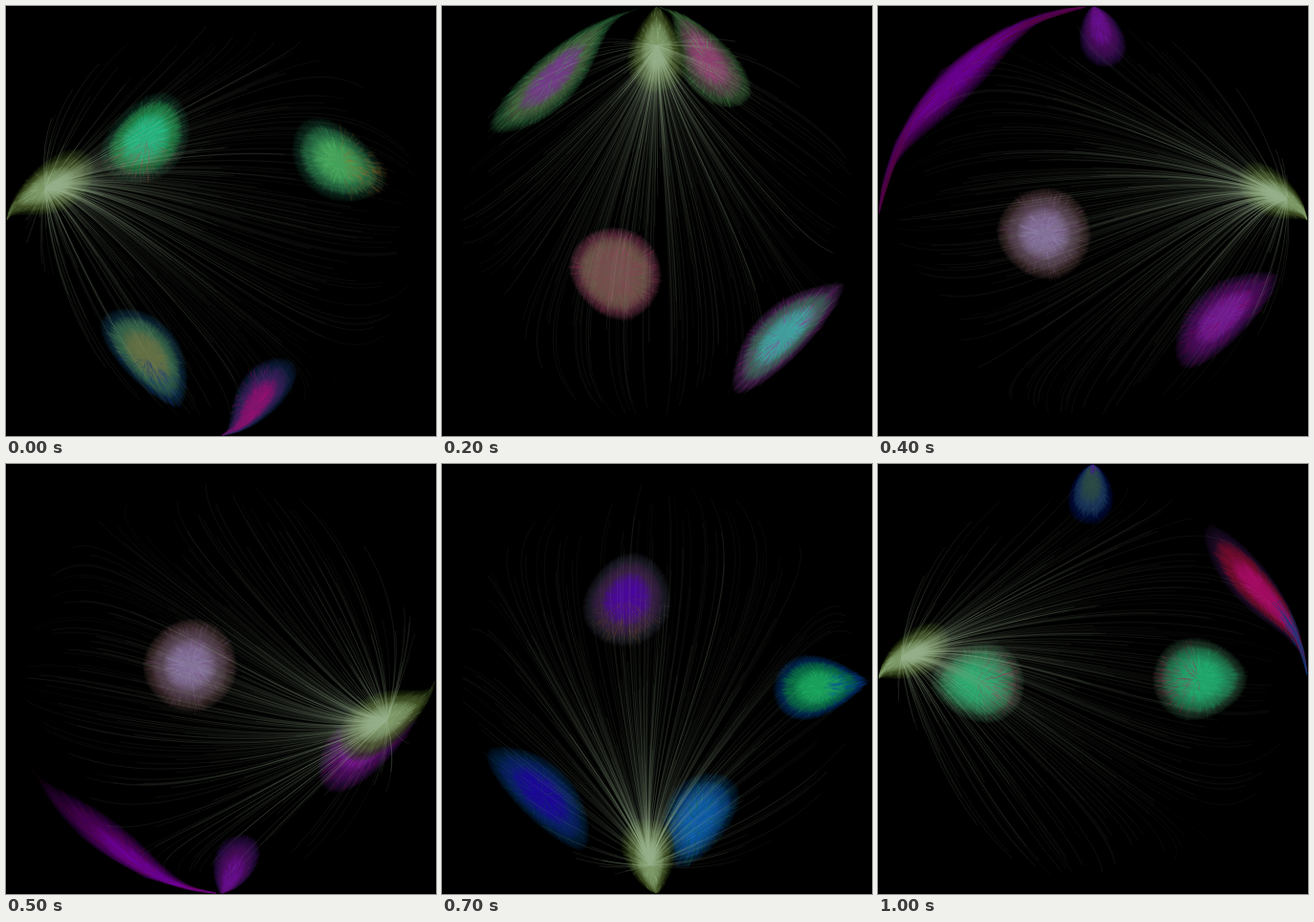
An HTML page with a canvas that plays this animation: 450 px wide and 450 px high, repeating every 1100 ms.

```html
<!DOCTYPE html>
<html>
<head>
<meta charset="utf-8">
<style>
  html, body { margin: 0; width: 100%; height: 100%; overflow: hidden; background: #000; }
  canvas { display: block; }
</style>
</head>
<body>
<canvas id="stage" width="450" height="450"></canvas>
<script>
const ctx = document.getElementById('stage').getContext('2d');
const STEP = 100, STEPS = 11, TAU = Math.PI * 2, RADIUS = .22;

// Positions on a square from -1 to 1 whose opposite edges join
const blobKeys = [0, 2, 4, 6, 8, 10];
const blobs = [
  [[.32, .88], [-.2, .25], [-.23, .06], [-.06, -.19], [-.24, -.56], [-.02, -.94]],
  [[-.44, .67], [.7, .66], [.68, .56], [.75, .29], [.78, -.18], [.88, -.66]],
  [[.57, -.33], [.36, -.78], [.08, -.94], [.18, .84], [.33, .5], [.5, 0]],
  [[-.38, -.41], [-.66, -.77], [-.86, -.87], [-.65, .8], [-.63, .48], [-.54, .02]]
];
const sourceKeys = [0, 1, 2, 3, 4, 6, 8, 10];
const source = [[-.83, -.27], [-.79, -.82], [0, -.82], [.75, -.83], [.91, -.24], [.67, .85], [-.8, .89], [-.9, -.22]];

// Edge, middle, core, fleck and an optional side for the flecks
const palettes = [
  ['124 426 a17 917 left', '134 475 774 138 down', '132 385 5b6 a62 right', '132 295 2c9 a44 down'],
  ['024 146 012 035', '013 024 025 024', '024 035 147 036', '012 024 135 024'],
  ['634 765 755 a36', '425 476 4bb a29', '353 645 a48 5a5', '253 564 83a 4a5'],
  ['433 656 98b 747', '314 516 82a 805', '315 516 71a 414', '304 506 70a 612'],
  ['223 425 50b 642 down', '036 184 2b6 04a right', '024 159 16b 063', '024 127 20a 145'],
  Array(4).fill('025 174 2c4 148'),
  ['014 246 354 51a up', '213 813 b17 048 right', '243 296 2b7 a25 left', '243 396 2b7 a25 right']
];
const sides = { right: 0, down: TAU / 4, left: TAU / 2, up: -TAU / 4 };
const paletteAt = step => palettes[step < 3 ? step : Math.floor(step / 2) + 1];

let seed;
function random() {
  seed = (seed * 1664525 + 1013904223) % 4294967296;
  return seed / 4294967296;
}

// A long jump means that the part leaves through one edge and returns at the other
function blend(a, b, t) {
  let gap = b - a;
  if (Math.abs(gap) > 1.6) gap -= 2 * Math.sign(gap);
  const v = a + gap * t;
  return Math.abs(v) > 1 ? v - 2 * Math.sign(v) : v;
}

function placeAt(keys, places, step) {
  const next = keys.findIndex(key => key >= step);
  if (keys[next] === step) return places[next];
  const t = (step - keys[next - 1]) / (keys[next] - keys[next - 1]);
  return places[next - 1].map((v, i) => blend(v, places[next][i], t));
}

// Square to disc: x = p * sqrt(1 - y²), y = q * sqrt(1 - x²)
function project(p, q) {
  const clamp = v => Math.max(-.9995, Math.min(.9995, v));
  p = clamp(p);
  q = clamp(q);
  const k = Math.sqrt(1 - p * p * q * q);
  return [225 + 224 * p * Math.sqrt(1 - q * q) / k, 225 + 224 * q * Math.sqrt(1 - p * p) / k];
}

function drawBlob([p, q], palette, strands = 800) {
  const [edge, middle, core, fleck, side] = palette.split(' ');
  const bands = [edge, middle, core].map(c => '#' + c);
  const layers = 21;
  const at = (angle, r) => project(p + Math.cos(angle) * r * RADIUS, q + Math.sin(angle) * r * RADIUS);
  ctx.globalAlpha = .15;
  for (let i = 0; i < layers; i++) {
    ctx.beginPath();
    for (let k = 0; k < 90; k++) ctx.lineTo(...at(k / 90 * TAU, Math.sqrt(1 - i / layers)));
    ctx.fillStyle = bands[Math.floor(i / layers * 3)];
    ctx.fill();
  }
  // Fine radial fibres give the feathery grain
  ctx.lineWidth = .7;
  for (let i = 0; i < strands; i++) {
    const angle = random() * TAU, r = Math.sqrt(random()) * .85;
    const chance = side ? Math.cos(angle - sides[side]) * .8 : .3;
    const band = Math.min(2, Math.floor((1 - r) * 3.4));
    ctx.strokeStyle = random() < chance ? '#' + fleck : bands[band];
    ctx.globalAlpha = .15 + .4 * random() * (1 - r * .6);
    ctx.beginPath();
    ctx.moveTo(...at(angle, r));
    ctx.lineTo(...at(angle, r + .08 + random() * .14));
    ctx.stroke();
  }
  ctx.globalAlpha = 1;
}

// Straight lines on the square become the curved rays
function drawRays([p, q]) {
  const [x, y] = project(p, q);
  const fade = ctx.createRadialGradient(x, y, 0, x, y, 410);
  [[0, .5], [.06, .36], [.16, .24], [.5, .17], [1, .1]]
    .forEach(([stop, alpha]) => fade.addColorStop(stop, `rgba(150,176,140,${alpha})`));
  ctx.strokeStyle = fade;
  ctx.lineWidth = .7;
  for (let i = 0; i < 300; i++) {
    const dp = (random() * 2 - 1) * .93 - p, dq = (random() * 2 - 1) * .93 - q;
    ctx.globalAlpha = .3 + .7 * random();
    ctx.beginPath();
    for (let t = 0; t <= 40; t++) ctx.lineTo(...project(p + dp * t / 40, q + dq * t / 40));
    ctx.stroke();
  }
  ctx.globalAlpha = 1;
}

function draw(step) {
  seed = 77;
  ctx.fillStyle = '#000';
  ctx.fillRect(0, 0, 450, 450);
  const colors = paletteAt(step);
  // The blobs rest between the second and third step
  const blobStep = step === 1 ? 2 : step;
  blobs.forEach((places, i) => drawBlob(placeAt(blobKeys, places, blobStep), colors[i]));
  const origin = placeAt(sourceKeys, source, step);
  drawBlob(origin, '231 563 9b8 8a7', 250);
  seed = 4242;
  drawRays(origin);
}

let shown = -1;
const start = performance.now();
function tick() {
  const step = Math.floor((performance.now() - start) / STEP) % STEPS;
  if (step !== shown) draw(shown = step);
  requestAnimationFrame(tick);
}
tick();
</script>
</body>
</html>
```
